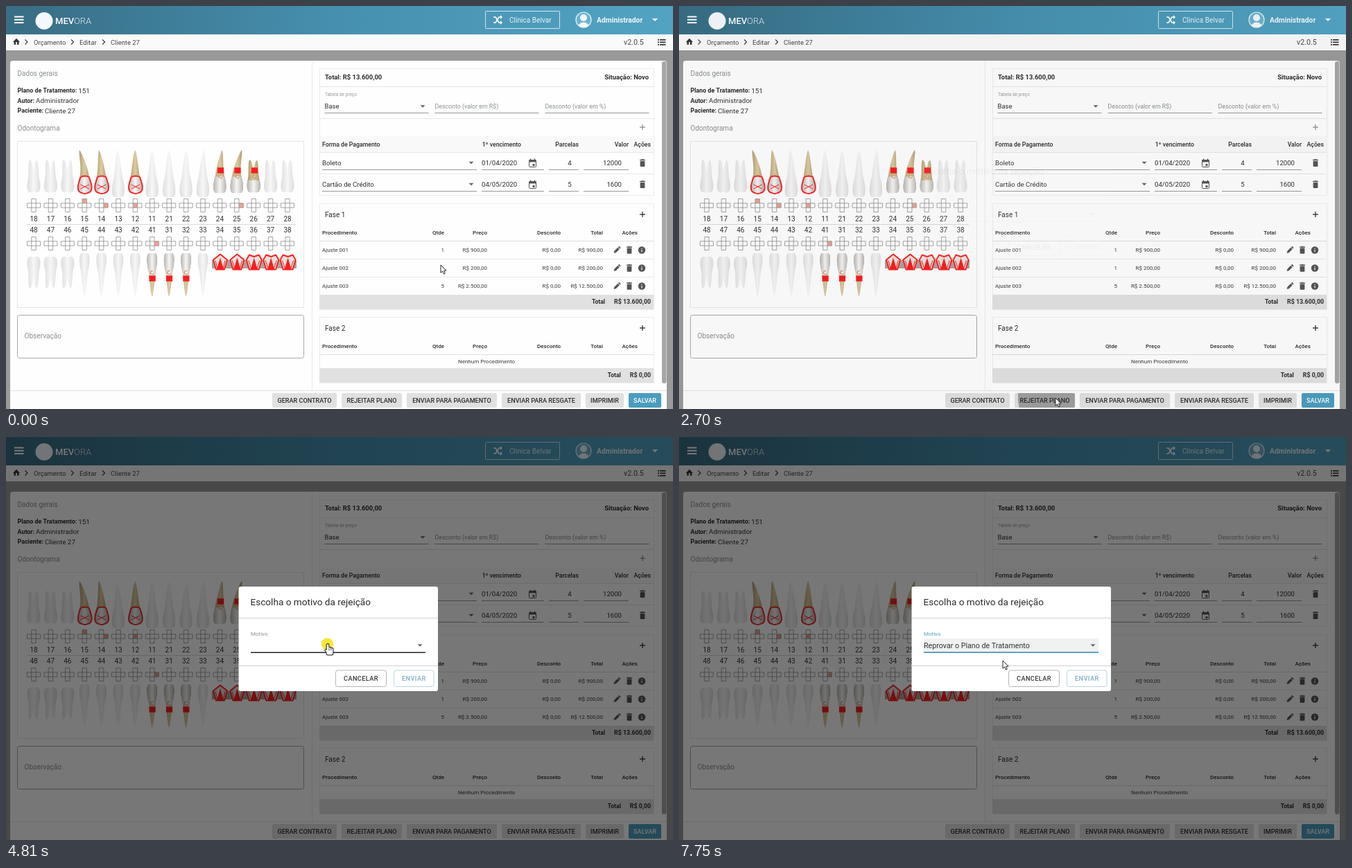
Write an HTML page with a canvas that moves like this. It is 962 px wide and 582 px high and loops after 8000 ms.

```html
<!DOCTYPE html>
<html lang="pt">
<head>
<meta charset="utf-8">
<title>Orçamento</title>
<style>
html, body { margin: 0; width: 100%; height: 100%; overflow: hidden; background: #999; }
canvas { display: block; width: 962px; height: 582px; }
</style>
</head>
<body>
<canvas id="stage" width="962" height="582"></canvas>
<script>
const c = document.getElementById('stage').getContext('2d');
const LOOP = 8000;
const INK = '#2c2c2c', SOFT = '#8a8f8f', LINE = '#e6e6e6', RED = '#fa1e1e', BLUE = '#4a9dbf', ICON = '#555';

// Moments of the story, in ms
const PRESS = 2400, FADE = 2700, OPEN = 4810, PICK = 7140, CHOSEN = 7290;

const clamp = v => Math.max(0, Math.min(1, v));
const ramp = (t, a, b) => clamp((t - a) / (b - a));
const ease = p => p * p * (3 - 2 * p);

// ---------- primitives ----------
function text(s, x, cy, size, color = INK, weight = 400, align = 'left', gap = 0) {
  c.font = `${weight} ${size}px Roboto, Arial, sans-serif`;
  c.letterSpacing = gap + 'px';
  c.textAlign = align;
  c.fillStyle = color;
  c.fillText(s, x, cy + size * 0.355);
}
const right = (s, x, cy, size, weight, color) => text(s, x, cy, size, color, weight, 'right');
function rect(x, y, w, h, color) { c.fillStyle = color; c.fillRect(x, y, w, h); }
const hline = (x1, x2, y, color = LINE, h = 1) => rect(x1, y, x2 - x1, h, color);
function paint(fill, stroke, width = 1) {
  if (fill) { c.fillStyle = fill; c.fill(); }
  if (stroke) { c.strokeStyle = stroke; c.lineWidth = width; c.lineJoin = 'round'; c.stroke(); }
}
function round(x, y, w, h, r, fill, stroke, width) {
  c.beginPath();
  c.roundRect(x, y, w, h, r);
  paint(fill, stroke, width);
}
function poly(points, fill, stroke, width) {
  c.beginPath();
  points.forEach(p => c.lineTo(...p));
  if (fill) c.closePath();
  paint(fill, stroke, width);
}
function disc(x, y, r, fill) { c.beginPath(); c.arc(x, y, r, 0, 7); paint(fill); }
function at(x, y, drawing) { c.save(); c.translate(x, y); drawing(); c.restore(); }

// ---------- icons ----------
const caret = (x, y, color = '#666', r = 3.5) => poly([[x - r, y - r / 2], [x + r, y - r / 2], [x, y + r / 2]], color);
const chevron = x => poly([[x - 2, 48.5], [x + 1.5, 52], [x - 2, 55.5]], null, '#444', 1.3);
function plus(x, y, color) {
  rect(x - 4, y - .6, 8, 1.2, color);
  rect(x - .6, y - 4, 1.2, 8, color);
}
const trash = (x, y) => at(x, y, () => {
  hline(-4, 4, -5, ICON, 1.4);
  hline(-1.5, 1.5, -5.7, ICON);
  round(-3.4, -2.9, 6.8, 8.2, 1, ICON);
});
const pencil = (x, y) => at(x, y, () => {
  c.rotate(Math.PI / 4);
  rect(-1.7, -6.3, 3.4, 1.9, ICON);
  rect(-1.7, -3.6, 3.4, 7.6, ICON);
  poly([[-1.7, 4], [1.7, 4], [0, 6]], ICON);
});
const info = (x, y) => {
  disc(x, y, 5.2, ICON);
  rect(x - .6, y - .5, 1.2, 3.3, '#fff');
  rect(x - .6, y - 2.7, 1.2, 1.2, '#fff');
};
const calendar = (x, y) => at(x, y, () => {
  round(-5, -4.5, 10, 10, 1, null, ICON);
  rect(-5, -5, 10, 3.4, ICON);
  [-3, 3].forEach(dx => rect(dx - .7, -6.5, 1.4, 2, ICON));
  rect(0, 1, 3, 3, ICON);
});
const shuffle = (x, y) => at(x, y, () => [-4, 4].forEach(s => {
  poly([[-6, s], [-3, s], [2, -s], [5, -s]], null, '#fff', 1.6);
  poly([[4, s - 3], [7, s], [4, s + 3]], '#fff');
}));

// ---------- teeth: one letter per tooth ----------
// m molar, g single root, c red crown, f filling, F molar with filling, r / R red cap
const UPPER = { kinds: 'mmmccgcggggffFmm', marks: '...tr.c.....r...', y: 288 };
const LOWER = { kinds: 'mmmggggfffgrrRRR', marks: '.......r........', y: 343 };
const MARK = { t: [0, -1], r: [1, 0], c: [0, 0] };

function singleRoot(lean) {
  const side = s => [[lean + s * .22, .04], [s * .42, .36], [s * .62, .58], [s * .95, .74], [s * 1.12, 1], [s * .5, 1]];
  const r = side(1), l = side(-1);
  c.moveTo(lean, 0);
  c.bezierCurveTo(...r[0], ...r[1], ...r[2]);
  c.bezierCurveTo(...r[3], ...r[4], ...r[5]);
  c.lineTo(...l[5]);
  c.bezierCurveTo(...l[4], ...l[3], ...l[2]);
  c.bezierCurveTo(...l[1], ...l[0], lean, 0);
}
function molarRoots() {
  c.moveTo(0, .4);
  c.bezierCurveTo(.05, .2, .2, 0, .5, .02);
  c.bezierCurveTo(.75, .1, .6, .45, .9, .65);
  c.bezierCurveTo(1.1, .9, .8, 1.05, 0, .96);
  c.bezierCurveTo(-.8, 1.05, -1.1, .9, -.9, .65);
  c.bezierCurveTo(-.6, .45, -.9, .1, -.6, 0);
  c.bezierCurveTo(-.3, 0, -.1, .2, 0, .4);
}
function shade(edge, mid) {
  const g = c.createLinearGradient(-1, 0, 1, 0);
  [edge, mid, edge].forEach((color, i) => g.addColorStop(i / 2, color));
  return g;
}
function tooth(x, tip, end, w, molar, lean, split) {
  at(x, tip, () => {
    c.scale(w / 2, end - tip);
    c.beginPath();
    molar ? molarRoots() : singleRoot(lean);
    paint(split ? shade('#a8905f', '#dccba4') : shade('#dcdcdc', '#f6f6f6'));
    c.clip();
    if (split) rect(-2, split, 4, 1, shade('#b3b1af', '#f6f5f3'));
  });
}
function filling(x, y, swirlY) {
  c.beginPath();
  c.arc(x, swirlY, 2.6, .6, 5);
  paint(null, '#cf8f5a', 1.1);
  rect(x - 4.6, y - 4.2, 9.2, 8.4, RED);
}
const redCrown = (x, y) => at(x, y, () => {
  c.beginPath();
  c.moveTo(-6, -12);
  c.quadraticCurveTo(0, -15, 6, -12);
  c.bezierCurveTo(9, -4, 14, 9, 4, 11);
  c.quadraticCurveTo(0, 13, -4, 11);
  c.bezierCurveTo(-14, 9, -9, -4, -6, -12);
  paint(null, RED, 1.9);
  [-1, 1].forEach(s => poly([[-6 * s, -1], [0, 2], [6 * s, 5]], null, RED));
});
const redCap = (x, cusps) => at(x, 370.5, () => {
  const w = 9 + cusps;
  const top = cusps > 1 ? [[-7, -11], [0, -8.5], [7, -11]] : [[0, -12]];
  poly([[-w, -4], ...top, [w, -4], [w - 4, 10], [4 - w, 10], [-w, -4]], '#e6e1dd', RED, 1.9);
  poly([[0, -7], [5, 10], [-5, 10]], RED);
  [-1, 1].forEach(s => poly([[s * (w - 3), -3], [s * 4, 9]], null, RED));
});

function jaw({ kinds, marks, y }, upper) {
  [...kinds].forEach((kind, i) => {
    const x = 40 + 24.4 * i, off = i - 7.5;
    const molar = 'mF'.includes(kind), plain = 'mg'.includes(kind);
    if ('rR'.includes(kind)) redCap(x + .6, kind === 'R' ? 2 : 1);
    else {
      const tip = upper ? (molar ? 222 : 208) : (molar ? 408 : 420);
      const end = upper ? (kind === 'g' ? 276 : 270) : (molar ? 361 : 357);
      const lean = upper ? .75 * (off / 4.6) ** 3 : 0;
      tooth(x, tip, end, upper ? 20 : molar ? 20 : 16, molar, lean, plain ? 0 : upper ? .62 : .48);
    }
    if (kind === 'c') redCrown(x + .5, 259);
    if ('fF'.includes(kind)) upper ? filling(x + 1.2, 237.5, 246) : filling(x + .3, 393.5, 385);

    const mark = MARK[marks[i]];
    if (mark) rect(x + 6.4 * mark[0] - 3.2, y + 6.4 * mark[1] - 3.2, 6.4, 6.4, '#efa08e');
    c.strokeStyle = '#8f8f8f';
    c.lineWidth = .8;
    c.strokeRect(x - 9.5, y - 3.2, 19, 6.4);
    c.strokeRect(x - 3.2, y - 9.5, 6.4, 19);

    const quadrant = upper ? (off < 0 ? 1 : 2) : (off < 0 ? 4 : 3);
    text(quadrant * 10 + Math.abs(off) + .5, x, upper ? 307 : 323, 10, '#333', 400, 'center');
  });
}

// ---------- page parts ----------
function header() {
  const g = c.createLinearGradient(0, 0, 962, 0);
  ['#386d84', '#4690af', '#52a3c3'].forEach((color, i) => g.addColorStop(i / 2, color));
  rect(0, 0, 962, 41, g);
  for (let i = 0; i < 3; i++) rect(12, 14.5 + 4.3 * i, 13.5, 2, '#fff');
  disc(55, 21.5, 12.5, '#f4f8fa');
  text('MEV', 71, 21.5, 13, '#fff', 500);
  text('ORA', 98, 21.5, 13, '#dcebf2', 300);

  round(691.5, 7.5, 107, 25, 1, null, 'rgba(255,255,255,.75)');
  shuffle(709, 20);
  text('Clinica Belvar', 726, 20, 10.1, '#e9f4f8');
  c.save();
  c.beginPath();
  c.arc(833, 20, 11, 0, 7);
  paint('#6db2cd', '#e8f4f9', 1.2);
  c.clip();
  disc(833, 17, 5, '#f0f7fa');
  disc(833, 32, 8.5, '#f0f7fa');
  c.restore();
  text('Administrador', 852, 20, 10.3, '#f0f7fa', 600);
  caret(936, 20, '#fff', 4.2);

  rect(0, 41, 962, 23, '#fafafa');
  poly([[10, 52], [15, 46.8], [20, 52]], '#333');
  [11.5, 16].forEach(x => rect(x, 51.5, 2.5, 4.3, '#333'));
  [29.5, 96, 141].forEach(chevron);
  text('Orçamento', 40, 52.5, 9.4, '#444');
  text('Editar', 106, 52.5, 9.6, '#444');
  text('Cliente 27', 151, 52.5, 9.4, '#444');
  text('v2.0.5', 891, 52, 10.7, '#444');
  for (let y = 48; y < 57; y += 3.5) {
    rect(940, y, 2, 1.7, '#333');
    rect(943, y, 8.5, 1.7, '#333');
  }
}

function leftSide() {
  text('Dados gerais', 16.5, 97, 10, SOFT);
  const facts = { 'Plano de Tratamento:': '151', 'Autor:': 'Administrador', 'Paciente:': 'Cliente 27' };
  Object.entries(facts).forEach(([key, value], i) => {
    const y = 122 + 14.5 * i;
    text(key, 16.5, y, 8.9, INK, 600);
    text(value, 18.5 + c.measureText(key).width, y, 9.9, '#333');
  });
  text('Odontograma', 16.5, 176.5, 10, SOFT);
  round(16.5, 195.5, 413, 240, 0, null, LINE);
  rect(297, 367, 122, 12, '#aaa19b');
  jaw(UPPER, true);
  jaw(LOWER, false);
  hline(30, 418, 315, '#d8d8d8');
  round(16.5, 446.5, 413, 62, 3, null, '#a8a8a8');
  text('Observação', 26.5, 476, 10.1, SOFT);
}

function payments() {
  round(452.5, 90.5, 482, 183, 0, null, '#ededed');
  text('Total: R$ 13.600,00', 460, 103, 9.4, INK, 600);
  right('Situação: Novo', 927, 103, 9.4, 600);
  [116, 162, 211, 242].forEach(y => hline(452, 934, y));
  text('Tabela de preço', 460, 128, 6.5, '#999');
  ['Base', 'Desconto (valor em R$)', 'Desconto (valor em %)'].forEach((s, i) => {
    const x = 459.5 + 159 * i;
    text(s, x, 145, i ? 8.8 : 9.5, i ? SOFT : INK);
    hline(x, x + 150, 154, '#969696');
  });
  caret(601, 145);
  plus(918, 175, '#888');
  rect(453, 188, 481, 23, '#f9f9f9');
  text('Forma de Pagamento', 456, 199.5, 8.7, INK, 500);
  [['1º vencimento', 743], ['Parcelas', 826], ['Valor', 898], ['Ações', 930]]
    .forEach(([s, x]) => right(s, x, 199.5, 8.7, 500));
  [['Boleto', '01/04/2020', 4, 12000], ['Cartão de Crédito', '04/05/2020', 5, 1600]].forEach(([kind, date, parts, value], i) => {
    const y = 226.5 + 31 * i;
    text(kind, 456, y, 9.6);
    caret(671, y);
    text(date, 686, y, 9.6);
    calendar(759.5, y + .5);
    text(parts, 813, y, 9.6, INK, 400, 'center');
    right(value, 888, y, 9.6);
    [[456, 679], [686, 776], [783, 826], [833, 898]].forEach(([a, b]) => hline(a, b, y + 9.5, '#999'));
    trash(918, y + .3);
  });
}

const COLUMNS = [632, 694, 800, 861, 911];

function phase(name, y, rows, total) {
  const bottom = y + 75 + 26 * Math.max(rows.length, .77);
  const cells = (values, cy, weight) => values.forEach((s, i) => right(s, COLUMNS[i], cy, 8, weight, weight ? INK : '#3a3a3a'));
  round(452.5, y + .5, 482, bottom - y, 0, null, '#ededed');
  text(name, 460, y + 16, 10);
  plus(918, y + 16, '#222');
  text('Procedimento', 456, y + 42.5, 8, INK, 500);
  cells(['Qtde', 'Preço', 'Desconto', 'Total', 'Ações'], y + 42.5, 500);
  hline(452, 934, y + 54, '#dedede');
  rows.forEach(([qty, price, sum], i) => {
    const cy = y + 67.5 + i * 26;
    text('Ajuste 00' + (i + 1), 456, cy, 8, '#3a3a3a');
    cells([qty, 'R$ ' + price, 'R$ 0,00', 'R$ ' + sum], cy);
    [pencil, trash, info].forEach((icon, k) => icon(881 + 18 * k, cy));
    hline(452, 934, cy + 12.5);
  });
  if (!rows.length) text('Nenhum Procedimento', 693, y + 64.5, 8, '#3a3a3a', 400, 'center');
  rect(452, bottom - 21, 482, 21, '#e1e1e1');
  right(total, 930, bottom - 11, 8.8, 600);
  right('Total', 917 - c.measureText(total).width, bottom - 11, 8.6, 600);
}

function footer(t) {
  rect(6, 555, 947, 27, '#fdfdfd');
  hline(6, 953, 555, '#e2e2e2');
  const labels = ['GERAR CONTRATO', 'REJEITAR PLANO', 'ENVIAR PARA PAGAMENTO', 'ENVIAR PARA RESGATE', 'IMPRIMIR', 'SALVAR'];
  const starts = [384, 484, 578, 715, 836, 898, 952];
  labels.forEach((s, i) => {
    const x = starts[i], w = starts[i + 1] - x - 7, main = s === 'SALVAR';
    round(x, 559, w, 21, 2, main ? BLUE : '#e0e0e0');
    if (i === 1 && t > PRESS) {
      c.save();
      c.clip();
      disc(543, 566, .18 * (t - PRESS), `rgba(0,0,0,${.3 * (1 - ramp(t, FADE, 2900)) ** 1.5})`);
      c.restore();
    }
    text(s, x + w / 2, 569.5, 9.1, main ? '#fff' : INK, 500, 'center');
  });
}

function page(t) {
  rect(0, 64, 962, 518, '#9a9a9a');
  round(6, 79, 947, 510, 4, '#fefefe');
  rect(441, 80, 1, 475, '#e9e9e9');
  header();
  leftSide();
  payments();
  phase('Fase 1', 285, [[1, '900,00', '900,00'], [1, '200,00', '200,00'], [5, '2.500,00', '12.500,00']], 'R$ 13.600,00');
  phase('Fase 2', 449, [], 'R$ 0,00');
  round(946, 80, 6.5, 465, 3, '#a6a6a6');
  footer(t);
}

function button(s, x, w, ink, border) {
  round(x, 337, w, 23.5, 3, '#fff', border);
  text(s, x + w / 2, 348.7, 9.2, ink, 500, 'center', .4);
}

function dialog(t) {
  const chosen = t >= CHOSEN, hover = t > 3880;
  round(335.5, 216, 287.5, 151, 3, '#fff');
  text('Escolha o motivo da rejeição', 352.5, 238, 13.6, '#2a2a2a');
  [261, 330].forEach(y => hline(336, 623, y, '#d2d2d2'));
  if (chosen) {
    rect(353, 291, 252, 20, '#f0f1f1');
    text('Reprovar o Plano de Tratamento', 353, 301, 10.7, '#333');
  }
  text('Motivo', 353, 284.5, 8, chosen ? BLUE : SOFT);
  caret(597, 301);
  hline(353, 605, 310.5, hover && !chosen ? '#222' : '#949494', hover ? 1.5 : 1);
  if (chosen) hline(353, 353 + 252 * ease(ramp(t, CHOSEN, 7700)), 310.3, BLUE, 1.7);
  button('CANCELAR', 475.5, 73, '#333', '#b5b5b5');
  button('ENVIAR', 559.5, 57.5, '#79acc4', '#b9d3df');
}

function options(t) {
  c.save();
  c.globalAlpha = ease(ramp(t, OPEN + 150, OPEN + 320)) * (1 - ramp(t, CHOSEN, CHOSEN + 190));
  rect(353, 285, 252, 56, '#fff');
  const active = cursorAt(t)[1] > 313 ? 1 : 0;
  rect(353, 289.5 + 24 * active, 252, 24, '#f4f4f4');
  ['Enviar para revisão', 'Reprovar o Plano de Tratamento']
    .forEach((s, i) => text(s, 365, 301 + 24.5 * i, 10.8, '#444'));
  c.restore();
}

// ---------- pointer ----------
// time, x, y; it rests where two neighbours share a place
const PATH = [[0, 627, 374], [840, 517, 536], [980, 489, 560], [1160, 556, 567], [1850, 543, 566],
  [3220, 543, 566], [4030, 464, 299], [5420, 464, 299], [5820, 467, 323], [LOOP, 467, 323]];

function cursorAt(t) {
  const i = PATH.findIndex(k => k[0] > t);
  const [t0, x0, y0] = PATH[i - 1], [t1, x1, y1] = PATH[i];
  const p = ease(ramp(t, t0, t1));
  return [x0 + (x1 - x0) * p, y0 + (y1 - y0) * p];
}
function arrow() {
  poly([[0, 0], [0, 11.3], [2.6, 8.9], [4.4, 13], [6.3, 12.2], [4.6, 8.2], [8, 8.2], [0, 0]], '#fff', '#111', .9);
}
function hand() {
  const shape = (fill, stroke) => {
    round(-1.4, 0, 2.8, 11, 1.4, fill, stroke, 2);
    for (let i = 0; i < 3; i++) round(1.2 + 2 * i, 4.7 + .7 * i, 2.2, 6, 1, fill, stroke, 2);
    round(-1.4, 7.5, 8.8, 8, 2, fill, stroke, 2);
    poly([[-4.2, 8.4], [-2.4, 8.2], [0, 10], [0, 14], [-4.2, 8.4]], fill, stroke, 2);
  };
  shape(null, '#111');
  shape('#fff');
  for (let i = 0; i < 3; i++) rect(1 + 2 * i, 6, .6, 3.4, '#444');
}
function pointer(t) {
  const [x, y] = cursorAt(t);
  const clicked = [[PRESS, 200], [OPEN, 165], [PICK, 150]].some(([from, span]) => t >= from && t < from + span);
  const onButton = t < 2600 && y > 559;
  const onSelect = t < CHOSEN && y < 325 && t > (y < 312 ? 3260 : 5400);
  if (clicked) disc(x - .6, y - .2, 8.6, '#f6e634');
  at(x, y, onButton || onSelect ? hand : arrow);
}

function draw(t) {
  page(t);
  const shown = .045 * ramp(t, FADE - 60, FADE) + .955 * ramp(t, FADE, FADE + 103);
  if (shown) {
    rect(0, 0, 962, 582, `rgba(0,0,0,${.53 * shown})`);
    c.globalAlpha = shown;
    dialog(t);
    c.globalAlpha = 1;
    options(t);
  }
  pointer(t);
}

const start = performance.now();
function tick() {
  draw((performance.now() - start) % LOOP);
  requestAnimationFrame(tick);
}
tick();
</script>
</body>
</html>
```
